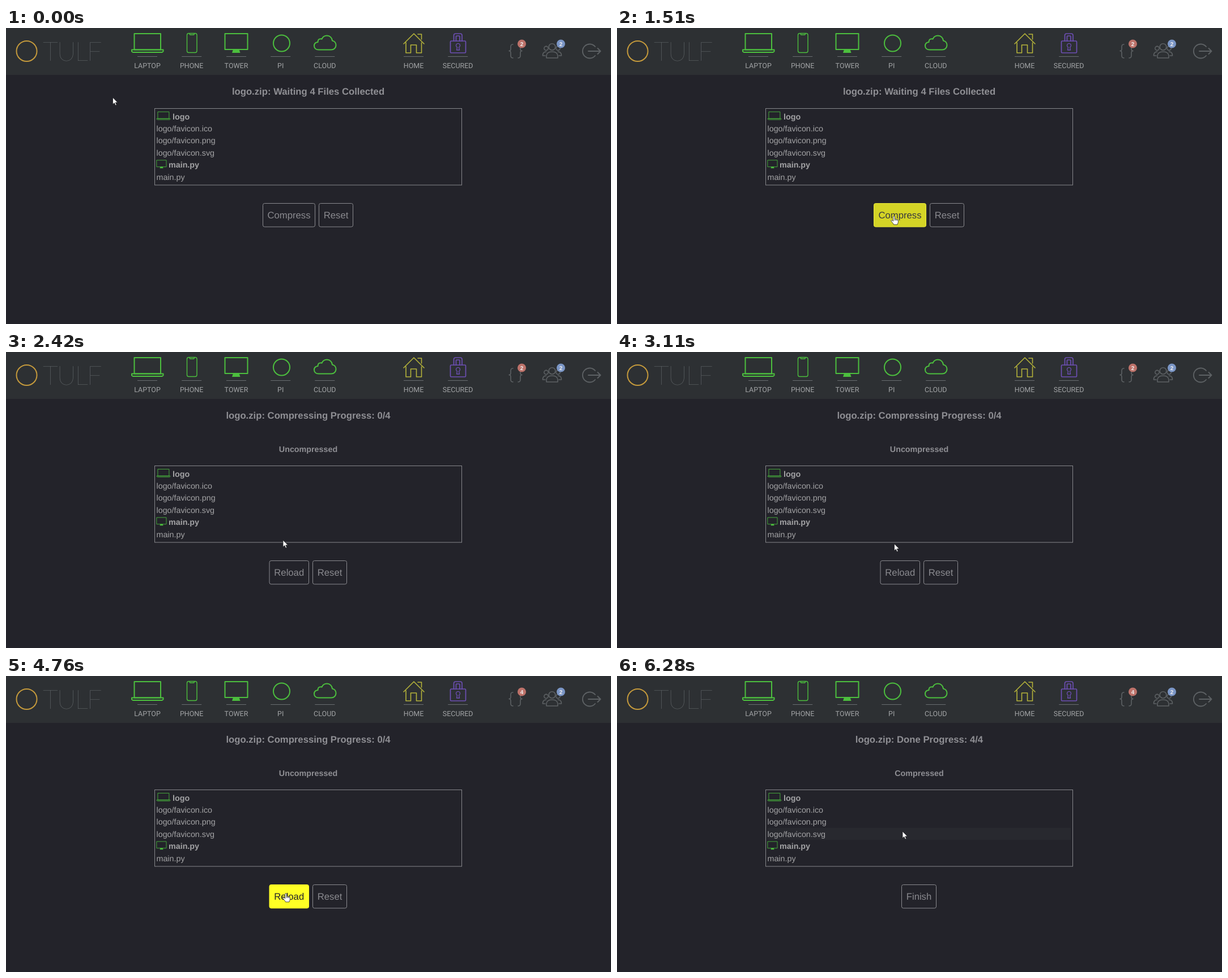
An HTML page that plays this animation: 1068 px wide and 524 px high, repeating every 6830 ms.

```html
<!DOCTYPE html>
<html lang="en">
<head>
<meta charset="utf-8">
<title>Compress files</title>
<style>
html, body { margin: 0; width: 100%; height: 100%; overflow: hidden; background: #23232a; }
svg { display: block; width: 100%; height: 100%; }
text { font-family: "Liberation Sans", Arial, sans-serif; text-rendering: geometricPrecision; }
.line { fill: none; stroke-width: 2; stroke-linejoin: round; stroke-linecap: round; }
.green { stroke: #4cbf3e; }
.solid { fill: #4cbf3e; stroke: none; }
.grey { stroke: #5d6164; stroke-width: 1.6; }
.brand { font: 200 47px Lato, Inter, sans-serif; letter-spacing: -2px; fill: #6b7073; }
.nav { font: 12.5px Roboto, sans-serif; fill: #a2a4a6; text-anchor: middle; }
.mid { text-anchor: middle; }
.title { font-size: 16.7px; font-weight: bold; fill: #8f8f94; }
.sub { font-size: 14.3px; font-weight: bold; fill: #8f8f94; }
.item { font-size: 14.3px; fill: #a3a3a5; }
.head { font-weight: bold; }
.btn { font-size: 16.7px; }
.badge { font-size: 10px; font-weight: bold; fill: #f1eeee; text-anchor: middle; }
.pointer { fill: #fff; stroke: #1c1c20; stroke-width: .8; stroke-linejoin: round; }
</style>
</head>
<body>
<svg viewBox="0 0 1068 524">
  <defs>
    <g id="laptop" class="line green">
      <rect x="226.5" y="10" width="46.5" height="28.5"/>
      <path d="M222 38.5H277.5V41.5L275.5 43H224L222 41.5Z"/>
    </g>
    <g id="tower" class="line green">
      <rect x="386.5" y="10" width="40" height="28"/>
      <path class="solid" d="M401 38H411.5L413.5 44H399Z"/>
    </g>
  </defs>
  <rect width="1068" height="524" fill="#23232a"/>
  <rect width="1068" height="83" fill="#2d3033"/>

  <circle class="line" cx="36.5" cy="41" r="18" stroke="#c59a3c"/>
  <text class="brand" x="65" y="58">TULF</text>

  <use href="#laptop"/>
  <g class="line green" stroke-width="1.6">
    <rect x="319.5" y="9.5" width="17.5" height="34" rx="3" stroke-width="1.4"/>
    <path d="M324 10.5L325 12H331.500L332.500 10.5" stroke-width="1.4"/>
  </g>
  <use href="#tower"/>
  <circle class="line green" cx="486.5" cy="27" r="14.500"/>
  <path class="line green" d="M552 38.500h22c5 0 8.500-3.500 8.500-8s-3-7.500-6.500-8c-.5-5-4-9-9.500-9-4.500 0-7.500 2.500-9 6-6-1-7 2-7 5.500-4 .5-6.500 3-6.500 6.500 0 4 3 7 8 7z"/>
  <path class="line" stroke="#b5b33a" style="stroke-width:1.6" d="M702 28L720 10 738 28M706 26V44H714.500V30H724.500V44H733.500V26M727 11H733.500V20"/>
  <g class="line" stroke="#6d4fb5" style="stroke-width:1.7">
    <rect x="784.500" y="23" width="27" height="21" rx="1.500"/>
    <path d="M790.500 23V13Q790.500 10 793.500 10H802Q805 10 805 13V23M794.500 23V15Q794.500 14 795.500 14H800Q801 14 801 15V23"/>
    <path d="M796.500 34L795.500 39H800.500L799.500 34A3.500 3.500 0 1 0 796.500 34Z" style="stroke-width:1.3"/>
  </g>
  <g id="nav"></g>

  <g class="line grey">
    <path id="brace" d="M895 29c-3 0-4 1-4 4v4c0 2-1 3.500-3 3.500 2 0 3 1.500 3 3.500v5c0 3 1 4 4 4"/>
    <use href="#brace" transform="matrix(-1 0 0 1 1799 0)"/>
    <circle cx="964" cy="33.500" r="5.800"/>
    <path d="M954 53v-3c0-6 4-8 10-8s10 2 10 8v3z"/>
    <circle cx="953.500" cy="36" r="3.600"/>
    <circle cx="974.500" cy="36" r="3.600"/>
    <path d="M952 49h-4.500c0-5 2-7 6-7M976 49h4.500c0-5-2-7-6-7"/>
    <path d="M1040 33A12.500 12.500 0 1 0 1040 49M1028 41H1049M1044.500 36l5 5-5 5" style="stroke-width:1.9"/>
  </g>
  <circle cx="910.500" cy="28" r="7.500" fill="#bd726a"/>
  <text class="badge" id="tasks" x="910.500" y="31.600">2</text>
  <circle cx="979.500" cy="28" r="7.500" fill="#7b96c6"/>
  <text class="badge" x="979.500" y="31.600">2</text>

  <text class="title mid" id="title" x="533.500" y="118"></text>
  <text class="sub mid" id="sub" x="533.500" y="176.700"></text>
  <g id="page">
    <rect id="row" x="266" width="535" height="21.400" fill="#28292f"/>
    <rect x="262.500" y="142.500" width="542" height="135.500" fill="none" stroke="#86878b"/>
    <use href="#laptop" transform="translate(173.200 144.200) scale(.42)"/>
    <use href="#tower" transform="translate(103.900 229.800) scale(.42)"/>
    <g id="items"></g>
    <g id="buttons"></g>
  </g>
  <path class="pointer" id="arrow" d="M0 0V12.200L2.800 9.600 4.700 14 6.700 13.200 4.800 8.900H8.700Z"/>
  <g class="pointer" id="hand">
    <path d="M-1.400 1c0-1.600 2.700-1.600 2.700 0v4.500c.4-.7 2-.6 2.200.3.500-.6 1.900-.4 2 .5.600-.5 1.800-.2 1.800.9v3.600c0 1.600-1.200 2.200-1.300 4.200h-6.600c-.2-2-3.200-4-4.400-6.600-.4-1.200 1-1.900 1.900-1l1.700 1.700z"/>
    <path d="M1.300 5.500V8M3.500 5.800V8M5.500 6.300V8" fill="none"/>
  </g>
</svg>
<script>
const LOOP = 6830, ROW = 21.4, SHIFT = 59;
const START = 2350, DONE = 5040, FADE = 300;
const $ = id => document.getElementById(id);

function add(parent, tag, attrs, label) {
  const el = document.createElementNS('http://www.w3.org/2000/svg', tag);
  for (const key in attrs) el.setAttribute(key, attrs[key]);
  if (label) el.textContent = label;
  return parent.appendChild(el);
}

[['LAPTOP', 249.5], ['PHONE', 327.7], ['TOWER', 406.5], ['PI', 484.7],
 ['CLOUD', 562.8], ['HOME', 719.5], ['SECURED', 797.7]].forEach(([label, x]) => {
  add($('nav'), 'path', { d: `M${x - 17.5} 50.5h35`, stroke: '#696d70' });
  add($('nav'), 'text', { class: 'nav', x, y: 71 }, label);
});

[['logo', 294], ['logo/favicon.ico', 265.5], ['logo/favicon.png', 265.5],
 ['logo/favicon.svg', 265.5], ['main.py', 287], ['main.py', 265.5]].forEach(([label, x], i) => {
  add($('items'), 'text', { class: i % 4 ? 'item' : 'item head', x, y: 161.5 + ROW * i }, label);
});

const pages = [
  { from: 0, title: 'Waiting 4 Files Collected', sub: '', buttons: [['Compress', 453.5, 92], ['Reset', 552.5, 60]] },
  { from: START, title: 'Compressing Progress: 0/4', sub: 'Uncompressed', buttons: [['Reload', 465, 69.5], ['Reset', 541.5, 60]] },
  { from: DONE, title: 'Done Progress: 4/4', sub: 'Compressed', buttons: [['Finish', 502.5, 61]] }
];
for (const page of pages) {
  page.group = add($('buttons'), 'g', {});
  page.parts = page.buttons.map(([label, x, width]) => ({
    box: add(page.group, 'rect', { x, y: 310.5, width, height: 41.5, rx: 3 }),
    text: add(page.group, 'text', { class: 'btn mid', x: x + width / 2, y: 336.7 }, label)
  }));
}

// pointer path: time, x, y
const path = [
  [0, 188.5, 123], [330, 188.5, 123], [500, 240, 170], [720, 350, 275], [900, 425, 345],
  [1020, 441, 356], [1130, 446, 358], [1360, 471, 345], [1510, 489, 333],
  [3040, 489, 333], [3180, 490, 346], [3340, 493, 374], [3450, 494, 385],
  [5870, 494, 385], [6000, 497, 358], [6150, 502, 302], [6280, 504, 275], [LOOP, 504, 275]
];
// hovered spans of the first button: start, end
const hovers = [[1360, START], [3340, DONE]];

const mix = (a, b, k) => `rgb(${a.map((v, i) => Math.round(v + (b[i] - v) * k))})`;
const DARK = [35, 35, 42], GREY = [138, 138, 143], YELLOW = [255, 255, 37];

// CSS "ease": cubic-bezier(.25, .1, .25, 1)
function ease(p) {
  if (p <= 0 || p >= 1) return p <= 0 ? 0 : 1;
  let lo = 0, hi = 1, s = .5;
  for (let i = 0; i < 18; i++) {
    s = (lo + hi) / 2;
    const x = .75 * s * (1 - s) + s ** 3;
    if (x < p) lo = s; else hi = s;
  }
  return .3 * s * (1 - s) ** 2 + 3 * s * s * (1 - s) + s ** 3;
}

function pointer(t) {
  const i = path.findIndex((p, n) => n && t <= p[0]);
  const a = path[i - 1], b = path[i], k = (t - a[0]) / (b[0] - a[0]);
  return [a[1] + (b[1] - a[1]) * k, a[2] + (b[2] - a[2]) * k];
}

const show = (el, on) => el.setAttribute('visibility', on ? 'visible' : 'hidden');

function draw(t) {
  const page = pages.filter(p => t >= p.from).pop();
  const shift = t >= START ? SHIFT : 0;
  $('title').textContent = 'logo.zip: ' + page.title;
  $('sub').textContent = page.sub;
  $('tasks').textContent = t >= 4760 ? 4 : 2;
  $('page').setAttribute('transform', `translate(0 ${shift})`);
  pages.forEach(p => show(p.group, p === page));

  const span = hovers.find(([a, b]) => t >= a && t < b);
  const glow = span ? ease((t - span[0]) / FADE) : 0;
  page.parts.forEach(({ box, text }, i) => {
    const k = i ? 0 : glow;
    box.setAttribute('fill', mix(DARK, YELLOW, k));
    box.setAttribute('stroke', mix(GREY, YELLOW, k));
    text.setAttribute('fill', mix(GREY, DARK, k));
  });

  const [x, y] = pointer(t);
  const row = Math.floor((y - shift - 145.5) / ROW);
  show($('row'), x > 266 && x < 801 && row >= 0 && row < 6);
  $('row').setAttribute('y', 145.5 + ROW * row);

  const hand = span || (t >= DONE && t < 5110);
  for (const id of ['arrow', 'hand']) $(id).setAttribute('transform', `translate(${x} ${y})`);
  show($('hand'), hand);
  show($('arrow'), !hand);
}

const begin = performance.now();
function tick() {
  draw((performance.now() - begin) % LOOP);
  requestAnimationFrame(tick);
}
tick();
</script>
</body>
</html>
```
